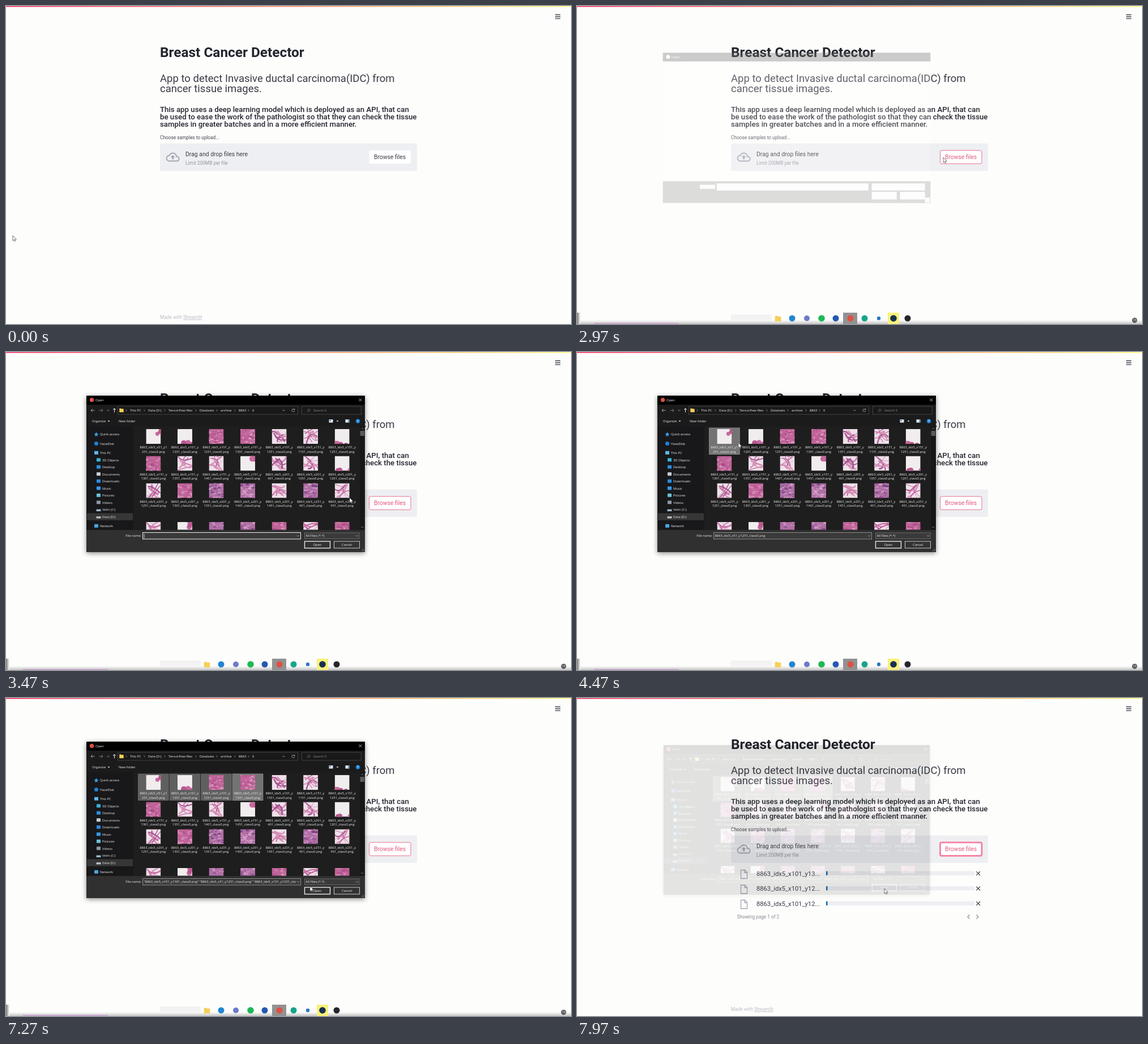
These frames come from a looping animation (998x561 px, 8000 ms). An HTML page:

```html
<!DOCTYPE html>
<html lang="en">
<head>
<meta charset="utf-8">
<style>
  html, body { margin: 0; width: 100%; height: 100%; overflow: hidden; background: #fdfdfc; }
  svg { display: block; }
  #page, #taskbar { font-family: Roboto, sans-serif; }
  #dialog, #skeleton { font-family: "Open Sans", sans-serif; }
  .shadow { filter: drop-shadow(0 2px 4px #0007); }
</style>
</head>
<body>
<script>
const LOOP = 8000;
const DIM = '#a3a8b4';

// ---------- markup helpers (text y is the vertical middle) ----------
const text = (x, y, str, size, fill, extra = '') =>
  `<text x="${x}" y="${y + size * 0.36}" font-size="${size}" fill="${fill}" ${extra}>${str}</text>`;
const rect = (x, y, w, h, fill, extra = '') =>
  `<rect x="${x}" y="${y}" width="${w}" height="${h}" fill="${fill}" ${extra}/>`;
const line = (d, stroke, width = 1, extra = '') =>
  `<path d="${d}" fill="none" stroke="${stroke}" stroke-width="${width}" ${extra}/>`;
const dot = (x, y, r, fill) => `<circle cx="${x}" cy="${y}" r="${r}" fill="${fill}"/>`;
const folder = (x, y, s) =>
  `<path transform="translate(${x} ${y}) scale(${s})" fill="#f5cf55" d="M-5-4h4l1 1h5v8H-5z"/>`;

// ---------- web page ----------
function uploadRow(y, name) {
  return line(`M289.5 ${y - 6}h7l4 4v11h-11zM296 ${y - 6}v4.5h4.5`, DIM, 1.3) +
    text(317, y, name, 11.2, '#3a3c46') +
    rect(440, y - 4, 262, 7.6, '#eeeff2', 'rx="1.5"') +
    rect(440, y - 4, 2.5, 7.6, '#1266b0', 'rx="1"') +
    line(`M705.3 ${y - 3.4}l6.8 6.8m0-6.8l-6.8 6.8`, '#31333f', 1.2);
}

const page = `<g id="page">
  ${rect(0, 0, 998, 1.6, 'url(#rainbow)')}
  ${line('M970 15.5h9.2M970 19h9.2M970 22.4h9.2', '#3a3c44', 1.4)}
  ${text(272, 81.5, 'Breast Cancer Detector', 24.4, '#23252e', 'font-weight="700"')}
  ${text(272, 127, 'App to detect Invasive ductal carcinoma(IDC) from', 18.5, '#3a3c45')}
  ${text(272, 145, 'cancer tissue images.', 18.5, '#3a3c45')}
  ${['This app uses a deep learning model which is deployed as an API, that can',
     'be used to ease the work of the pathologist so that they can check the tissue',
     'samples in greater batches and in a more efficient manner.']
    .map((s, i) => text(272, 182.5 + i * 13, s, 13.25, '#23252e', 'font-weight="500"')).join('')}
  ${text(272, 232, 'Choose samples to upload...', 8.3, '#44464f')}
  ${rect(272, 242.5, 454, 48.5, '#eeeff2', 'rx="3"')}
  <g transform="translate(282.6 254.6)">
    ${line('M18.6 11C18 7.4 15.4 5 12 5 9.3 5 7.2 6.5 6 9 3.1 9.3 1 11.4 1 14c0 2.8 2.2 5 5 5h13c2.2 0 4-1.8 4-4s-1.9-4-4.4-4z', DIM, 2)}
    <path d="M12 8.5l4 4h-2.6v3.5h-2.8v-3.5H8z" fill="${DIM}"/>
  </g>
  ${text(317, 261.3, 'Drag and drop files here', 10.45, '#3a3c46')}
  ${text(317, 276.5, 'Limit 200MB per file', 8.4, '#9497a1')}
  <rect id="button" x="641.5" y="254.8" width="73.5" height="23.5" rx="2.5" fill="#fff"/>
  <g id="buttonLabel">${text(650, 266.7, 'Browse files', 10.35, 'currentColor')}</g>
  <g id="uploads">
    ${uploadRow(309.5, '8863_idx5_x101_y13...')}
    ${uploadRow(336, '8863_idx5_x101_y12...')}
    ${uploadRow(362.5, '8863_idx5_x101_y12...')}
    ${text(282.5, 386, 'Showing page 1 of 2', 8.25, '#858892')}
    ${line('M693.5 382.5l-3.5 3.5 3.5 3.5M705.5 382.5l3.5 3.5-3.5 3.5', '#858892', 1.2)}
  </g>
  ${text(272, 549, 'Made with <tspan text-decoration="underline">Streamlit</tspan>', 8.4, '#bcbec6')}
</g>`;

// ---------- taskbar ----------
const taskbar = `<g id="taskbar">
  ${rect(0, 541, 998, 20, '#fdfdfc')}
  ${rect(272, 544, 72, 12, '#f3f3f3')}
  ${rect(0, 554, 998, 7, 'url(#edge)')}
  ${rect(0, 541, 6, 20, 'url(#side)')}
  ${rect(30, 559, 150, 2, '#c9a9cf')}
  ${rect(470, 541, 25, 20, '#929292')}
  ${rect(549, 541, 20, 20, '#f9f07a')}
  ${folder(355, 551, 1.05)}
  ${[[380, 5.5, '#2186d0'], [406, 5, '#6a7bc8'], [432, 5.8, '#1db954'], [457, 5.5, '#2459b0'], [483, 5.5, '#dd5144'],
     [508, 5.5, '#16a58a'], [533, 3.2, '#2a78c2'], [559, 5.8, '#17314e'], [584, 5.5, '#25252a']]
    .map(([x, r, c]) => dot(x, 551, r, c)).join('')}
  ${dot(985, 554.5, 4.5, '#55565a')}
  ${text(985, 554.5, '15', 5, '#fff', 'text-anchor="middle"')}
</g>`;

// ---------- file dialog ----------
const SIZE = 5.8;
const small = (x, y, str, extra = '') => text(x, y, str, SIZE, '#f0f0f0', extra);
const chevron = (x, y) => line(`M${x - 1} ${y - 1.8}l1.8 1.8-1.8 1.8`, '#aaa', 0.7);
const caretDown = (x, y) => line(`M${x - 2} ${y - 1}l2 2 2-2`, '#bbb', 0.8);

const files = [[51, [1251]], [101, [1201, 1251, 1301, 1351]], [151, [1151, 1251, 1301, 1351, 1401, 1451]],
  [201, [401, 1051, 1201, 1251, 1301, 1351, 1401, 1451]], [251, [401, 451]]]
  .flatMap(([x, ys]) => ys.map(y => `8863_idx5_x${x}_y${y}_class0.png`));

let seed = 7;
const random = (lo, hi) => {
  seed = (seed * 16807) % 2147483647;
  return lo + (hi - lo) * seed / 2147483647;
};
const choose = list => list[Math.floor(random(0, list.length))];

// Tissue sample: r = blank with a right corner, l = blank with a low edge, m = strands, p = pink, v = violet
const TISSUE = {
  r: { base: '#f1ecee', tones: ['#c8689f', '#b9578f'] },
  l: { base: '#f1ecee', tones: ['#c8689f', '#b9578f'] },
  m: { base: '#eee0e9', tones: ['#c76aa2', '#a3538f', '#d68db5'] },
  p: { base: '#c0659a', tones: ['#d98ab4', '#a84b86', '#b5528f', '#dba3c2'] },
  v: { base: '#b16fa6', tones: ['#71417f', '#8c4f92', '#c98fb9', '#d9a9c9'] },
};
function thumbnail(x, y, kind) {
  const { base, tones } = TISSUE[kind];
  let art = rect(0, 0, 26, 26, base);
  if (kind === 'r') {
    for (let i = 0; i < 4; i++) art += dot(random(20, 28), random(-1, 9), random(3, 5), choose(tones));
  } else if (kind === 'l') {
    for (let i = 0; i < 6; i++) art += dot(random(-1, 27), random(23, 28), random(2, 5), choose(tones));
  } else if (kind === 'm') {
    for (let i = 0; i < 9; i++)
      art += line(`M${random(-3, 12)} ${random(-2, 28)}Q${random(4, 22)} ${random(0, 26)} ${random(14, 29)} ${random(-2, 28)}`,
        choose(tones), random(0.5, 2.6));
  } else {
    for (let i = 0; i < 40; i++)
      art += `<ellipse cx="${random(0, 26)}" cy="${random(0, 26)}" rx="${random(0.8, 3.5)}" ry="${random(0.6, 2)}" fill="${choose(tones)}" opacity=".8"/>`;
  }
  return `<svg x="${x - 13}" y="${y}" width="26" height="26">${art}</svg>`;
}

const columnX = col => 260.4 + col * 55.55;
const grid = ['rlppmml', 'pmmrmml', 'mpvvmvm', 'mrvvpmp'].map((kinds, row) => {
  const top = [136, 183.5, 231.5, 300][row];
  return [...kinds].map((kind, col) => {
    const x = columnX(col), name = files[row * 7 + col];
    const label = (str, dy) => small(x, top + dy, str, 'text-anchor="middle"');
    return thumbnail(x, top, kind) + (name ? label(name.slice(0, 16), 32) + label(name.slice(16), 39.6) : '');
  }).join('');
}).join('');

const places = [[145, 'Quick access', '#3a9be0', 0], [161.5, 'HazeDisk', '#1f82d6', 0], [178, 'This PC', '#5fb7e8', 0],
  [190.5, '3D Objects', '#35b5d9', 4], [203, 'Desktop', '#2a8fe0', 4], [215.5, 'Documents', '#c5ced6', 4],
  [228, 'Downloads', '#2b8ae6', 4], [240.5, 'Music', '#2f9df0', 4], [253, 'Pictures', '#6cc2dc', 4],
  [265.5, 'Videos', '#8d97a5', 4], [278, 'Velm (C:)', '#9fb6c8', 4], [290.5, 'Data (D:)', '#b9bdc2', 4],
  [307, 'Network', '#4aa7e2', 0]]
  .map(([y, name, color, indent], i) => {
    const x = 159.5 + indent;
    const icon = i === 1 ? dot(x, y, 3.5, color)
      : i === 0 ? `<path d="M${x} ${y - 4}l1.3 2.7 2.7.3-2 2 .5 3-2.5-1.5-2.5 1.5.5-3-2-2 2.7-.3z" fill="${color}"/>`
      : i > 9 && i < 12 ? rect(x - 4, y - 0.5, 8, 3.5, color)
      : rect(x - 3.5, y - 3.3, 7, 6, color, 'rx=".6"');
    return icon + small(166 + indent, y, name);
  }).join('');

const crumbs = [[219, 'This PC'], [251, 'Data (D:)'], [287, 'Tensorflow-files'], [342, 'Datatsets'],
  [379, 'archive'], [411, '8863'], [435, '0']]
  .map(([x, s]) => chevron(x - 6.5, 103) + small(x, 103, s)).join('');

const dialog = `<g id="dialog">
  ${rect(142, 77, 492, 276, '#1b1b1c', 'class="shadow"')}
  ${rect(142, 77, 492, 16, '#000')}
  ${dot(151.5, 84.5, 3.7, '#dd5144')}
  ${small(158, 84.5, 'Open')}
  ${line('M623.3 82l5 5m0-5l-5 5', '#eee', 0.8)}
  ${line('M156.5 103h-6.5m2.5-2.5l-2.5 2.5 2.5 2.5', '#bbb', 0.9)}
  ${line('M164.5 103h6.5m-2.5-2.5l2.5 2.5-2.5 2.5', '#888', 0.9)}
  ${caretDown(180.5, 103)}
  ${line('M191.5 106.5v-7m-2.5 2.5l2.5-2.5 2.5 2.5', '#eee', 1)}
  ${rect(197.5, 96, 318, 14, '#191919', 'stroke="#4b4b4b" stroke-width=".8"')}
  ${rect(522.5, 96, 105, 14, '#191919', 'stroke="#4b4b4b" stroke-width=".8"')}
  ${folder(204, 102.5, 0.75)}${crumbs}
  ${caretDown(490.5, 103)}
  ${line('M509.5 101.5a2.5 2.5 0 1 0 .3 2.3M509.8 100v2h-2', '#bbb', 0.8)}
  ${line('M532 105.5l1.5-1.5a2 2 0 1 1 .5.4', '#888', 0.7)}
  ${text(543, 103, 'Search 0', SIZE, '#8d8d8d')}
  ${small(152, 122, 'Organize')}${small(199, 122, 'New folder')}
  <path d="M179.5 121h4l-2 2.2zM583.5 121h4l-2 2.2z" fill="#ddd"/>
  ${rect(570.5, 119, 7, 5.5, '#e6eaf0')}${rect(571.5, 120, 2.5, 2, '#3c8cd0')}
  ${rect(599.5, 119, 7, 5.5, '#e6eaf0')}${rect(604, 119.7, 2, 4, '#3ca0d8')}
  ${dot(621.5, 122, 3.8, '#1a7fd4')}${text(621.5, 122, '?', 5.5, '#fff', 'text-anchor="middle" font-weight="700"')}
  ${rect(143, 131, 82, 182.5, '#18181a')}
  ${rect(143, 284.3, 81, 12.5, '#363636')}
  ${rect(225, 131, 400, 182.5, '#1e1e1e')}
  ${places}
  <svg width="625" height="313.5">
    ${[0, 1, 2, 3].map(i => rect(columnX(i) - 26.8, 134, 53.6, 46.5, '#646464', `id="cell${i}" stroke-width=".8"`)).join('')}
    ${grid}
  </svg>
  ${rect(625, 131, 8.5, 182.5, '#171717')}${rect(625.5, 139, 7.5, 9, '#5a5a5a')}
  ${line('M627.3 136l2-2 2 2M627.3 308l2 2 2-2', '#999', 0.8)}
  ${rect(142, 314, 492, 39, '#303031')}
  ${small(239, 324, 'File name:', 'text-anchor="end"')}
  <rect id="field" x="241.5" y="318.5" width="279" height="11.5" fill="#3a3a3b"/>
  <svg x="241" y="318" width="271" height="13"><text id="fileName" x="2.5" y="8.1" font-size="${SIZE}" fill="#f0f0f0"></text></svg>
  ${line('M244 320.5v8', '#fff', 0.7, 'id="caret"')}
  ${caretDown(516, 324.3)}
  ${rect(527.5, 319, 96.5, 10.5, '#3a3a3b', 'stroke="#777" stroke-width=".8"')}
  ${small(529.5, 324, 'All Files (*.*)')}${caretDown(620, 324.3)}
  ${rect(527.5, 334, 45, 12, '#333', 'stroke="#f4f4f4" stroke-width="1.3"')}
  ${rect(579.5, 334, 45, 12, '#333', 'stroke="#c8c8c8"')}
  ${small(550, 340, 'Open', 'text-anchor="middle"')}${small(602, 340, 'Cancel', 'text-anchor="middle"')}
  ${line('M628 351.5l4.5-4.5M630.5 351.5l2-2', '#999', 0.8)}
</g>`;

const skeleton = `<g id="skeleton">
  ${rect(142, 77, 492, 276, '#fff', 'opacity=".2"')}
  ${rect(142, 77, 492, 16, '#0003')}
  ${dot(151.5, 84.5, 3.5, '#fff')}${text(158, 84.5, 'Open', SIZE, '#fff')}
  ${rect(142, 313, 492, 40, '#0002')}
  ${[[210, 319.5, 28, 7.5], [241, 317, 279, 13], [526, 317, 98, 13], [526, 332.5, 46, 14], [578, 332.5, 46, 14], [624, 343, 9, 9]]
    .map(([x, y, w, h]) => rect(x, y, w, h, '#fdfdfd')).join('')}
</g>`;

const stops = (...list) => list.map(([at, color]) => `<stop offset="${at}" stop-color="${color}"/>`).join('');
document.body.innerHTML = `<svg width="998" height="561" viewBox="0 0 998 561">
  <defs>
    <linearGradient id="rainbow">${stops([0, '#f63366'], [0.5, '#fb8f6f'], [1, '#fffd80'])}</linearGradient>
    <linearGradient id="edge" x2="0" y2="1">${stops([0, '#fdfdfc'], [1, '#c6c6c6'])}</linearGradient>
    <linearGradient id="side">${stops([0, '#777'], [1, '#fdfdfc'])}</linearGradient>
  </defs>
  ${page}${taskbar}${skeleton}${dialog}
  <path id="cursor" d="M0 0V9.2L2.1 7.3 3.4 10.2 4.7 9.6 3.4 6.8H6.3Z" fill="#fff" stroke="#3c3c42" stroke-width=".7"/>
</svg>`;

// ---------- motion ----------
const el = Object.fromEntries([...document.querySelectorAll('[id]')].map(node => [node.id, node]));
const ramp = (t, from, to) => Math.min(1, Math.max(0, (t - from) / (to - from)));
const smooth = u => u * u * (3 - 2 * u);
const show = (node, visible) => { node.style.display = visible ? '' : 'none'; };

const cursorPath = [[0, 12, 405], [30, 12, 405], [400, 691, 76], [770, 490, 276], [870, 490, 276], [1600, 413, 385],
  [1830, 413, 385], [2400, 655, 250], [2630, 647, 267], [3000, 647, 267], [3450, 607, 257], [3500, 607, 257],
  [3640, 652, 240], [3980, 165, 190], [4240, 262, 152], [4440, 285, 160], [4600, 285, 160], [4930, 318, 158],
  [5170, 322, 158], [5550, 372, 159], [5750, 374, 160], [6130, 421, 160], [6500, 421, 160], [7200, 537, 332],
  [7270, 537, 332], [7620, 543, 336], [LOOP, 543, 336]];
const clicks = [4250, 4950, 5560, 6160];

function cursorAt(t) {
  const i = cursorPath.findIndex(key => key[0] > t);
  const [t0, x0, y0] = cursorPath[i - 1], [t1, x1, y1] = cursorPath[i];
  const u = smooth(ramp(t, t0, t1));
  return [x0 + (x1 - x0) * u, y0 + (y1 - y0) * u];
}

// The newest selection moves to the front shortly after its click.
function fileNameAt(t) {
  const chosen = files.slice(0, clicks.filter(c => t >= c).length);
  if (chosen.length < 2) return chosen.join('');
  if (t > clicks[chosen.length - 1] + 150) chosen.unshift(chosen.pop());
  return chosen.map(name => `"${name}"`).join(' ');
}

function draw(t) {
  const hover = t >= 2380, uploaded = t >= 7900;
  el.button.setAttribute('stroke', hover ? (uploaded ? '#f57f9f' : '#ea7090') : 'none');
  el.button.setAttribute('stroke-width', uploaded ? 2.8 : 1);
  el.buttonLabel.style.color = hover ? '#e0587f' : '#3a3c46';
  show(el.uploads, uploaded);

  show(el.taskbar, t >= 2480 && t < 7860);
  el.taskbar.setAttribute('transform', `translate(0 ${20 * (1 - smooth(ramp(t, 2480, 2600)))})`);

  const opening = smooth(ramp(t, 2900, 3080)), closing = ramp(t, 7830, 7990);
  const zoom = `translate(388 215) scale(${0.94 + 0.06 * opening - 0.05 * closing}) translate(-388 -215)`;
  el.skeleton.setAttribute('transform', zoom);
  el.dialog.setAttribute('transform', zoom);
  show(el.skeleton, t >= 2930 && t < 3100);
  show(el.dialog, t >= 2985);
  el.dialog.setAttribute('opacity', ramp(t, 2985, 3110) * (1 - closing));

  clicks.forEach((at, i) => {
    const newest = t >= at && !(t >= clicks[i + 1]);
    show(el['cell' + i], t >= at);
    el['cell' + i].setAttribute('fill', newest ? '#737373' : '#5f5f5f');
    el['cell' + i].setAttribute('stroke', newest ? '#9a9a9a' : '#6c6c6c');
  });
  el.fileName.textContent = fileNameAt(t);
  el.field.setAttribute('stroke', t < clicks[0] ? '#f2f2f2' : '#8c8c8c');
  show(el.caret, t < clicks[0]);

  el.cursor.setAttribute('transform', `translate(${cursorAt(t)})`);
}

function tick() {
  draw(performance.now() % LOOP);
  requestAnimationFrame(tick);
}
tick();
</script>
</body>
</html>
```
